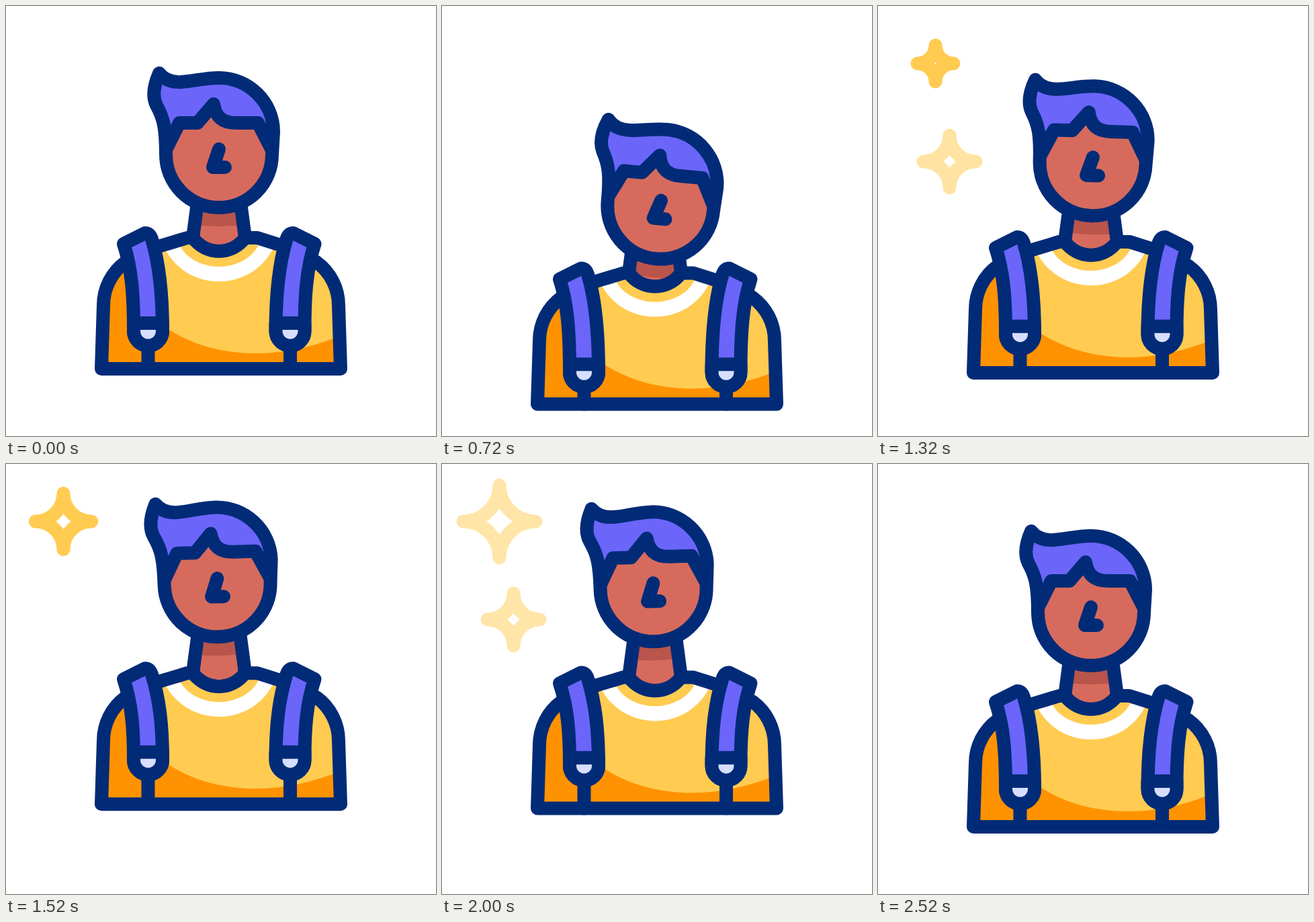
These frames come from a looping animation (640 px wide and 640 px high, 3000 ms). An HTML page:

```html
<!DOCTYPE html>
<html lang="en">
<head>
<meta charset="utf-8">
<title>Student</title>
<style>
  html, body { margin: 0; width: 100%; height: 100%; overflow: hidden; background: #fff; }
  svg { display: block; width: 100%; height: 100%; }
  .line { stroke: #022b77; stroke-width: 20; stroke-linecap: round; stroke-linejoin: round; }
  .star { fill: none; stroke: #ffcb51; stroke-width: 20; stroke-linejoin: round; }
</style>
</head>
<body>
<svg viewBox="0 0 640 640" fill="none">
  <defs>
    <path id="torso" d="M142 540L145 446A80 80 0 0 1 178 381L230 357L270 345H278C288 358 302 365 317 365S346 358 356 345H374L412 357L462 381A80 80 0 0 1 495 446L498 540Z"/>
    <path id="neck" d="M288 270L278 345C288 358 302 365 317 365S346 358 356 345L346 270"/>
    <clipPath id="inTorso"><use href="#torso"/></clipPath>
    <clipPath id="inNeck"><use href="#neck"/></clipPath>
    <g id="strap" class="line">
      <path d="M211.5 500V540"/>
      <path id="band" fill="#6b65fa"/>
      <path id="buckle" fill="#d8deff" d="M190 472H233V484A21.5 21.5 0 0 1 190 484Z"/>
    </g>
  </defs>

  <path class="star"/>
  <path class="star"/>

  <g id="body">
    <use href="#neck" fill="#d66b5d"/>
    <g clip-path="url(#inNeck)">
      <path class="head" fill="#b9554a" d="M260 322Q317 334 374 322V230H260Z"/>
    </g>
    <use href="#neck" class="line"/>
    <g clip-path="url(#inTorso)">
      <path fill="#ff9200" d="M120 330H520V560H120Z"/>
      <path fill="#ffcb51" d="M190 430C230 490 300 517 372 517C415 517 455 508 500 490V330H190Z"/>
      <path fill="#fff" d="M233 354C250 393 284 410 317 410S384 393 401 354L378 350C370 375 342 388 317 388S264 375 256 350Z"/>
    </g>
    <use href="#torso" class="line"/>
    <use href="#strap"/>
    <use href="#strap" transform="translate(634.5) scale(-1 1)"/>
    <g class="head">
      <path id="skull" fill="#d66b5d" d="M228 100C236 110 248 114 262 113C280 112 296 107 317 107C361 107 398 143 398 187L396 221A79 79 0 0 1 238 221C238 180 234 166 224 148C217 134 220 118 228 100Z"/>
      <path fill="#6b65fa" d="M228 100C236 110 248 114 262 113C280 112 296 107 317 107C361 107 398 143 398 187L395 213L375 174H342C322 174 312 165 309 146L285 174H258L239 212C238 180 234 166 224 148C217 134 220 118 228 100Z"/>
      <g class="line">
        <use href="#skull" style="fill-opacity:0"/>
        <path d="M239 212L258 174H285L309 146C312 165 322 174 342 174H375L395 213"/>
        <path d="M317 213L308 240H326"/>
      </g>
    </g>
  </g>
</svg>
<script>
const LOOP = 3000, STEP = 40;
const [body, band, buckle] = ['body', 'band', 'buckle'].map(id => document.getElementById(id));
const heads = document.querySelectorAll('.head');
const stars = document.querySelectorAll('.star');

const span = (t, from, to) => Math.min(1, Math.max(0, (t - from) / (to - from)));
const smooth = u => u * u * (3 - 2 * u);
const easeOut = u => 1 - (1 - u) ** 2;

// Crouch, stretch up, settle back to rest.
function track(t, low, high) {
  const down = smooth(span(t, 200, 867));
  const up = smooth(span(t, 960, 1670));
  const rest = smooth(1 - (1 - span(t, 1750, 2500)) ** 1.4);
  return low * down + (high - low) * up - high * rest;
}

// The top of the strap stays on the shoulder while its end slides.
function drawStrap(slide) {
  const end = 484 + slide;
  band.setAttribute('d', `M175 354L207 338Q214 338 217 347C228 383 233 ${425 + slide / 2} 233 ${end}A21.5 21.5 0 0 1 190 ${end}C190 ${430 + slide / 2} 187 390 175 354Z`);
  buckle.setAttribute('transform', `translate(0 ${slide})`);
}

function drawStar(el, x, y, r, alpha) {
  const c = 0.45 * r;
  el.setAttribute('d', `M0 ${-r}C0 ${-c} ${c} 0 ${r} 0C${c} 0 0 ${c} 0 ${r}C0 ${c} ${-c} 0 ${-r} 0C${-c} 0 0 ${-c} 0 ${-r}Z`);
  el.setAttribute('transform', `translate(${x} ${y})`);
  el.setAttribute('opacity', r > 0 ? alpha : 0);
}

function draw(t) {
  body.setAttribute('transform', `translate(0 ${track(t, 60, -46)})`);
  drawStrap(track(t, 10, -12));
  const pose = `translate(0 ${track(t, 27, -13.5)}) rotate(${track(t, 6, -2.5)} 317 312)`;
  heads.forEach(el => el.setAttribute('transform', pose));

  const fade = 1 - span(t, 1900, 2100);
  drawStar(stars[0], 85.5, 85.5, 54 * easeOut(span(t, 1067, 1933)), fade);

  // The small star twinkles twice.
  const first = t < 1440;
  const grow = first ? span(t, 1010, 1280) : span(t, 1520, 1900);
  drawStar(stars[1], 106.5, 231.5, 39 * easeOut(grow), first ? 1 - span(t, 1245, 1405) : fade);
}

function tick(now) {
  draw(Math.floor(now % LOOP / STEP) * STEP);
  requestAnimationFrame(tick);
}
draw(0);
requestAnimationFrame(tick);
</script>
</body>
</html>
```
